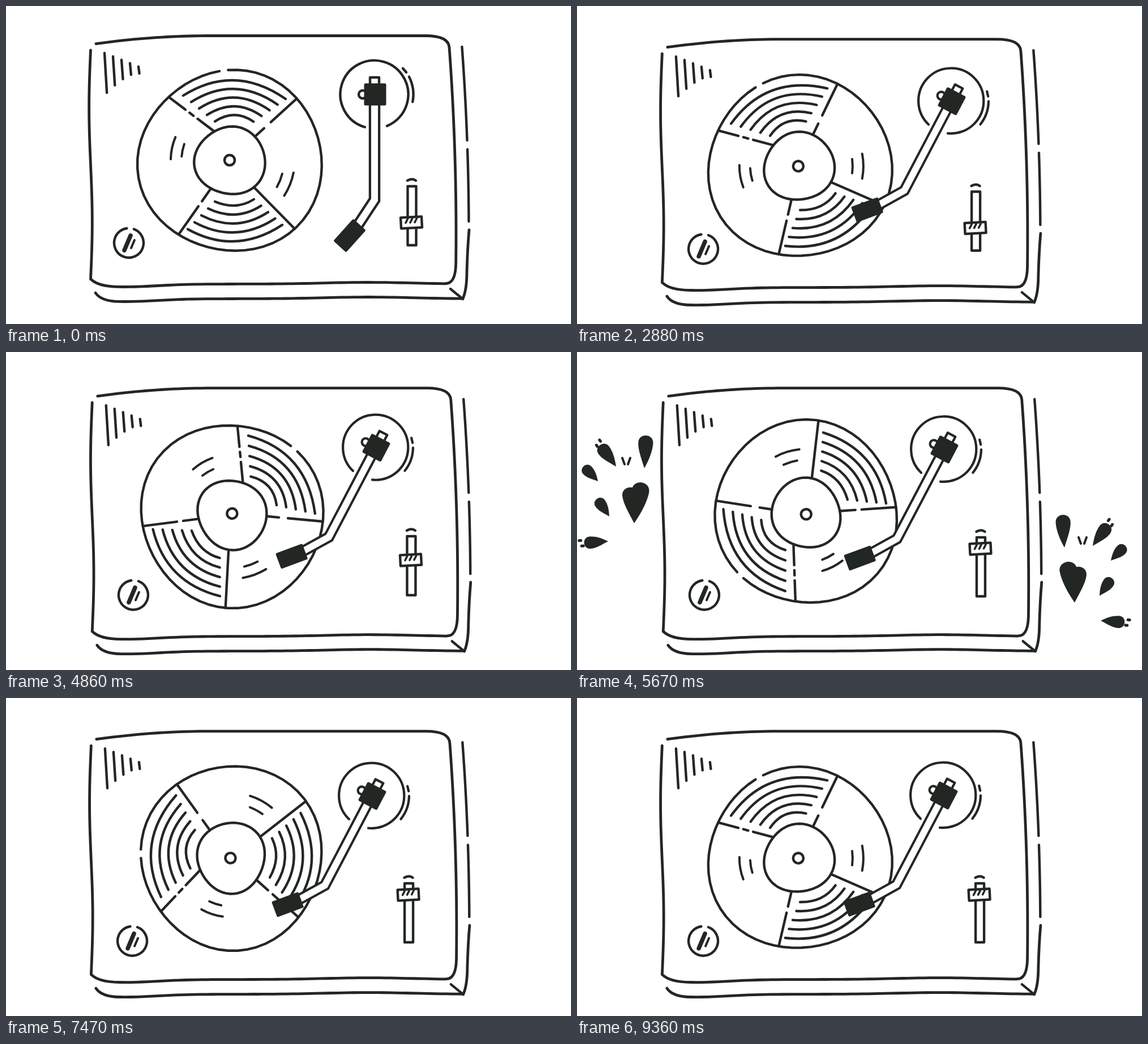
An HTML page with a canvas that plays this animation: 998x561 px, repeating every 9.45 s.

```html
<!DOCTYPE html>
<html lang="en">
<head>
<meta charset="utf-8">
<title>Turntable</title>
<style>
  html, body { margin: 0; width: 100%; height: 100%; overflow: hidden; background: #fff; }
  canvas { display: block; }
</style>
</head>
<body>
<canvas id="stage" width="998" height="561"></canvas>
<script>
const ctx = document.getElementById('stage').getContext('2d');
const INK = '#222723';
const STEP = 90, STEPS = 105;
const START = 12; // step at which the motor starts
const RAD = Math.PI / 180;

const clamp = v => Math.max(0, Math.min(1, v));
const ease = v => { v = clamp(v); return v * v * (3 - 2 * v); };
const cos = deg => Math.cos(deg * RAD);
const sin = deg => Math.sin(deg * RAD);
const bump = (x, mid, width) => Math.exp(-(((x - mid) / width) ** 2));

function stroke(trace, width = 4.4, fill) {
  ctx.lineWidth = width;
  ctx.lineCap = ctx.lineJoin = 'round';
  ctx.strokeStyle = INK;
  ctx.beginPath();
  trace();
  if (fill) { ctx.fillStyle = fill; ctx.fill(); }
  ctx.stroke();
}

function line(x1, y1, x2, y2, width) {
  stroke(() => { ctx.moveTo(x1, y1); ctx.lineTo(x2, y2); }, width);
}

// Curve from a to c that passes through b halfway.
function bow(ax, ay, bx, by, cx, cy, width) {
  stroke(() => {
    ctx.moveTo(ax, ay);
    ctx.quadraticCurveTo(2 * bx - (ax + cx) / 2, 2 * by - (ay + cy) / 2, cx, cy);
  }, width);
}

const arc = (x, y, r, from = 0, to = 360, width) =>
  stroke(() => ctx.arc(x, y, r, from * RAD, to * RAD), width);

const box = (x, y, w, h, fill, width) => stroke(() => ctx.rect(x, y, w, h), width, fill);

// Adds the points of f(v) to the path, v running from a to b.
function plot(a, b, f) {
  for (let i = 0; i <= 60; i++) ctx.lineTo(...f(a + (b - a) * i / 60));
}

function at(x, y, draw, turn = 0) {
  ctx.save();
  ctx.translate(x, y);
  ctx.rotate(turn * RAD);
  draw();
  ctx.restore();
}

// Slow sway over one turn of the record (18 steps).
const sway = (n, mid, c, s) => mid + c * cos(20 * n) + s * sin(20 * n);

// Quick shake that repeats every three steps.
const shake = (n, x, y, rise) =>
  n < START ? [0, 0] : [x + 1.25 * cos(120 * n), y + rise * sin(120 * n + 30)];

// Uneven edges of the case.
const topEdge = x => [x, 52.5 + 14 * (Math.max(0, 360 - x) / 200) ** 2];
const leftEdge = y => [149.5 - 2.8 * Math.sin((y - 78) / 404 * 2 * Math.PI), y];
const rightEdge = y => [795 - 12 * ((400 - y) / 327) ** 2, y];
const bottomEdge = x => [x, 490.5 + 5 * bump(x, 210, 80) - 3 * bump(x, 640, 110)];
const lowEdge = x => [x, bottomEdge(x)[1] + 26];
const sideEdge = y => [rightEdge(y)[0] + 22.5, y];

function drawCase() {
  stroke(() => {
    plot(159, 738, topEdge);
    ctx.bezierCurveTo(768, 52, 782, 60, 783, 73);
    plot(73, 455, rightEdge);
    ctx.quadraticCurveTo(794, 485, 781, 489);
    plot(775, 200, bottomEdge);
    ctx.quadraticCurveTo(163, 495, 150, 482);
    plot(482, 78, leftEdge);
  }, 4.8);
  stroke(() => {
    ctx.moveTo(158, 506);
    ctx.quadraticCurveTo(168, 521, 200, lowEdge(200)[1]);
    plot(200, 807, lowEdge);
    ctx.quadraticCurveTo(814, 500, 814, 470);
    ctx.quadraticCurveTo(815, 430, 818, 395);
  }, 4.8);
  stroke(() => plot(72, 237, sideEdge));
  stroke(() => plot(253, 380, sideEdge));
  line(785, 499, 807, 517);
  for (let i = 0; i < 5; i++) {
    const y = 83 + 6 * i, length = 12 + 58 * (1 - i / 4) ** 1.4;
    line(174 + 15 * i, y, 175 + 15 * i + length / 22, y + length);
  }
}

function drawKnob() {
  arc(217, 418, 26, -70, 262);
  line(220, 405, 209, 431, 7.5);
  line(227, 413, 221, 427, 4);
}

// Uneven circle around the spindle, bulging to the lower right.
const lumpy = (r, lump, oval) => a => {
  const size = r + lump * (cos(a - 46) + cos(3 * (a - 46))) + oval * cos(2 * a);
  return [size * cos(a), size * sin(a)];
};
const rim = lumpy(161, 3, 1.7);
const label = lumpy(61, 1.7, 1.6);

function spoke(outer, inner, dash) {
  ctx.setLineDash(dash);
  line(...rim(outer), ...label(inner));
  ctx.setLineDash([]);
}

function drawRecord(n) {
  const spin = clamp((n - START) / 7.1);
  const turn = (spin < 1 ? 71 * spin * spin : 20 * n + 49.25) + spin * sway(n, 0, -1.75, -9.2);
  const x = 395 + spin * sway(n, 4.3, -2.7, 9);
  const y = 272 + spin * sway(n, 2.4, -0.6, -2.2);
  at(x, y, () => {
    stroke(() => plot(-91, 263.5, rim));
    stroke(() => plot(0, 360, label));
    arc(0, 0, 9);
    spoke(-134, -118, [37, 9, 9, 9, 99]);
    spoke(-42.5, -43, [62, 16, 99]);
    spoke(46.5, 48, []);
    spoke(124.5, 123.5, [61, 11, 99]);
    for (let i = 0; i < 5; i++) {
      bow(-82 + 14 * i, -114 + 11.4 * i, 8.5, -141 + 15.3 * i, 99 - 14.2 * i, -108 + 10 * i);
      bow(-26 - 12 * i, 73 + 12.2 * i, 10, 80 + 15.8 * i, 43 + 12.5 * i, 69 + 11.3 * i);
    }
    for (const [r, spread] of [[104, 11], [85, 7.5]]) {
      arc(0, 0, r, 192 - spread, 192 + spread, 4);
      arc(0, 0, r + 11, 22 - spread, 22 + spread, 4);
    }
  }, turn);
}

function drawArm(n, jolt) {
  const swing = ease((n - 22) / 8), size = 1 - 0.04 * swing;
  const x = 652 + swing * (sway(n, -0.5, 2.5, 4) + 14 * jolt);
  const y = 156 + swing * (sway(n, 14.4, -1.6, -1.9) - 4 * jolt);
  at(x, y, () => {
    ctx.scale(size, size);
    arc(-1.5, 0, 60, 106, 428);
    line(49, -46, 55, -39);
    arc(-1.5, 0, 69, -27, 11);
    // Tube: a wide dark stroke with a white core.
    for (const [width, color] of [[20.5, INK], [12, '#fff']]) {
      ctx.lineWidth = width;
      ctx.lineCap = 'butt';
      ctx.lineJoin = 'miter';
      ctx.strokeStyle = color;
      ctx.beginPath();
      ctx.moveTo(-1, 10);
      ctx.lineTo(-1, 186);
      ctx.lineTo(-30, 230);
      ctx.stroke();
    }
    box(-9, -30, 16, 14, '#fff');
    arc(-22, 0, 7);
    box(-17, -17, 34, 34, INK, 5);
    at(-45, 249, () => box(-24, -13, 48, 26, INK), 132);
  }, 27.7 * swing);
}

function drawSlider(n, jolt) {
  const [x, y] = shake(n, 0.2, 5, 0);
  const up = ease((n - 51) / 6), knob = 371 - 44 * up;
  at(x - 5 * up - 12 * jolt, y + 4 * up + 4.5 * jolt, () => {
    bow(709, 308, 717, 305.5, 724, 308);
    box(709.5, 318, 15, 104, '#fff');
    at(716, knob + 11, () => {
      box(-18.5, -9.5, 37, 19, '#fff');
      for (let i = -1; i <= 1; i++) line(8 * i + 2, -7, 8 * i - 2, 0, 3.6);
    }, -3);
  });
}

// Comma-shaped drop pointing along the x axis, tip at the origin.
function drop(length) {
  const r = 5 + length * 0.18, head = -length;
  ctx.beginPath();
  ctx.moveTo(0, 0);
  ctx.bezierCurveTo(head * 0.35, -r * 0.6, head + r, -r, head, -r);
  ctx.bezierCurveTo(head - r * 1.3, -r, head - r * 1.3, r, head, r);
  ctx.bezierCurveTo(head + r, r, head * 0.4, r * 0.5, 0, 0);
  ctx.fillStyle = INK;
  ctx.fill();
}

function flecks(length) {
  for (const a of [158, 182]) {
    const dx = cos(a) * (length + 19), dy = sin(a) * 24 - 4;
    line(dx, dy, dx + 3, dy, 5);
  }
}

// Tip x, tip y, direction, length.
const DROPS = [
  [69, 202, 53, 36], [119, 205, 93, 45], [37, 228, 46, 27], [57, 290, 55, 28],
  [101, 302, 82, 50], [101, 302, 101, 58], [55, 334, -4, 32]
];

function splash(size) {
  DROPS.forEach(([x, y, dir, length], i) => at(x, y, () => {
    ctx.scale(size, size);
    drop(length);
    if (i % 6 === 0) flecks(length);
  }, dir));
  for (const k of [-1, 1]) line(87 + 7 * k, 187, 87 + 3 * k, 187 + 11 * size, 4);
}

function drawSplashes(n) {
  const size = ease((n - 56) / 5) * ease((70 - n) / 6);
  if (size <= 0) return;
  splash(size);
  at(980, 140, () => {
    ctx.scale(-1, 1);
    splash(size);
  });
}

function draw(n) {
  // The arm lands a little off and settles.
  const jolt = ease((n - 24) / 6) * ease((40 - n) / 7);
  ctx.fillStyle = '#fff';
  ctx.fillRect(0, 0, 998, 561);
  at(...shake(n, 1.5, 9.5, 3.4), () => {
    drawCase();
    drawRecord(n);
  });
  at(...shake(n, 6.7, 10.7, 0), drawKnob);
  drawSlider(n, jolt);
  drawArm(n, jolt);
  drawSplashes(n);
}

function tick() {
  draw(Math.floor(performance.now() / STEP) % STEPS);
  requestAnimationFrame(tick);
}
tick();
</script>
</body>
</html>
```
